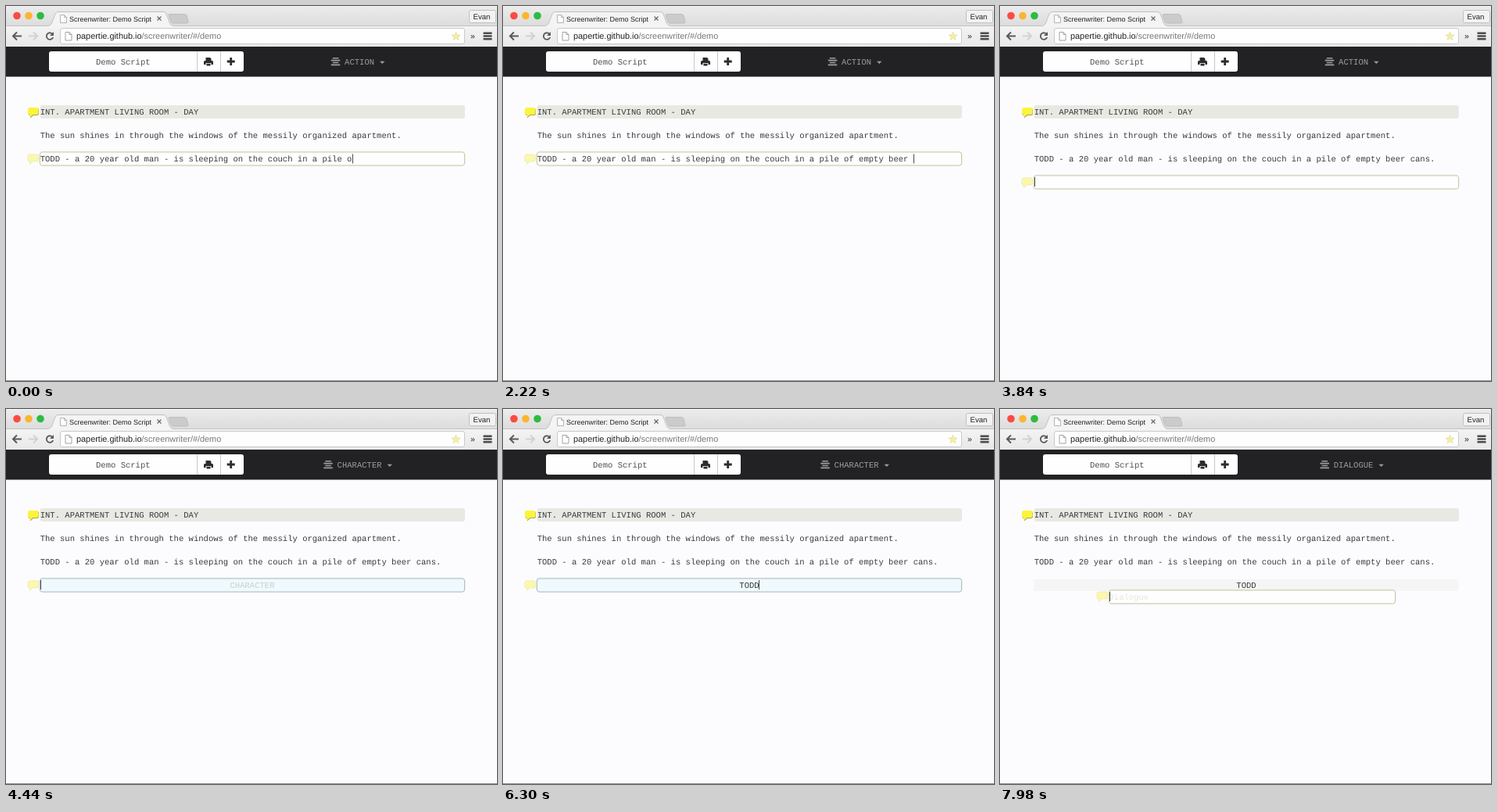
Animation of 628x480 px, one loop 8 s. Source, as an HTML page:

```html
<!DOCTYPE html>
<html lang="en">
<head>
<meta charset="utf-8">
<title>Screenwriter: Demo Script</title>
<style>
html, body { margin: 0; width: 100%; height: 100%; overflow: hidden; background: #fcfcfe; }
svg { display: block; width: 628px; height: 480px; }
text { text-rendering: geometricPrecision; white-space: pre; }
.ui { font-family: "Liberation Sans", Arial, sans-serif; fill: #222; }
.mono { font: 10.55px "Liberation Mono", "Courier New", monospace; fill: #3a3a3a; }
.mid { text-anchor: middle; }
.glow { fill: none; stroke-width: 2.5; opacity: .25; }
</style>
</head>
<body>
<svg viewBox="0 0 628 480" xmlns="http://www.w3.org/2000/svg">
  <defs>
    <linearGradient id="strip" x2="0" y2="1">
      <stop offset="0" stop-color="#ececec"/><stop offset="1" stop-color="#dcdcdc"/>
    </linearGradient>
    <linearGradient id="bar" x2="0" y2="1">
      <stop offset="0" stop-color="#f4f4f4"/><stop offset="1" stop-color="#e8e8e8"/>
    </linearGradient>
    <path id="bubble" d="M2.500 0H11.500Q13.500 0 13.500 2V7Q13.500 9 11.500 9H6.500L2.500 12.500V9H2Q0 9 0 7V2.500Q0 0 2.500 0Z"/>
  </defs>
  <rect width="628" height="480" fill="#fcfcfe"/>

  <!-- tab strip -->
  <rect width="628" height="26" fill="url(#strip)"/>
  <rect width="628" height="1" fill="#f6f6f6"/>
  <circle cx="14" cy="12.500" r="4.800" fill="#fb4b42"/>
  <circle cx="29" cy="12.500" r="4.800" fill="#fcb52f"/>
  <circle cx="44" cy="12.500" r="4.800" fill="#2cbc40"/>
  <path d="M209 10.500H228Q230 10.500 231 12.500L233 20Q233.500 22 231 22H214Q212 22 211 20L208 12Q208 10.500 209 10.500Z" fill="#cbcbcb" stroke="#b4b4b4" stroke-width=".7"/>
  <rect y="25" width="628" height="27" fill="url(#bar)"/>
  <path d="M0 25.500H54Q57 25 58.500 22L63 10Q64.500 7.500 67 7.500H201Q204 7.500 205 10L209.500 22Q211 25 214 25.500H628" fill="#f4f4f4" stroke="#b6b6b6" stroke-width=".8"/>
  <path d="M56 26H212" stroke="#f4f4f4" stroke-width="1.500"/>
  <path d="M69.500 11.500H74.500L77.500 14.500V21.500H69.500ZM74.500 11.500V14.500H77.500" fill="#fefefe" stroke="#adadad" stroke-width=".9"/>
  <text class="ui" x="81" y="19.500" font-size="9">Screenwriter: Demo Script</text>
  <path d="M193.500 13.500L198.500 18.500M198.500 13.500L193.500 18.500" stroke="#666" stroke-width="1.200"/>
  <rect x="592.500" y="5.500" width="34" height="16" rx="2" fill="#f2f2f2" stroke="#bbb" stroke-width=".9"/>
  <text class="ui mid" x="608.500" y="17" font-size="9.600">Evan</text>

  <!-- toolbar -->
  <g fill="none" stroke-width="2">
    <path d="M20 38.500H9.500M14 33.500L9 38.500L14 43.500" stroke="#5a5a5a"/>
    <path d="M29 38.500H39.500M35 33.500L40 38.500L35 43.500" stroke="#d2d2d2"/>
    <path d="M59.800 36.300A4.300 4.300 0 1 0 60.200 40" stroke="#5a5a5a" stroke-width="1.800"/>
  </g>
  <path d="M61 33V38H56Z" fill="#5a5a5a"/>
  <rect x="69.500" y="28.500" width="517" height="20" rx="2.500" fill="#fefefe" stroke="#c4c4c4" stroke-width=".9"/>
  <path d="M76 33.500H81L84 36.500V44H76ZM81 33.500V36.500H84" fill="#fefefe" stroke="#a2a2a2"/>
  <text class="ui" x="90" y="42.300" font-size="10.900">papertie.github.io<tspan fill="#777">/screenwriter/#/demo</tspan></text>
  <path id="star" fill="#f3f0a0" stroke="#dedca0" stroke-width=".7"/>
  <text class="ui mid" x="597" y="42" font-size="10.500">»</text>
  <path d="M610.500 34.800H621.500M610.500 38.500H621.500M610.500 42.200H621.500" stroke="#4a4a4a" stroke-width="2.500"/>

  <!-- app bar -->
  <rect y="52" width="628" height="38.500" fill="#222224"/>
  <rect x="55" y="58" width="249" height="26" rx="3" fill="#fefefe"/>
  <path d="M244.500 58V84M274.500 58V84" stroke="#c8c8c8"/>
  <text class="mono mid" x="149.800" y="75" style="fill:#505050">Demo Script</text>
  <g fill="#2c2c2c">
    <path d="M255.500 66H261L262.500 67.500V70H255.500ZM254.500 70H263.500Q265 70 265 71.500V75H262.500V73H255.500V75H253V71.500Q253 70 254.500 70ZM256.500 73.800H261.500V76.500H256.500Z"/>
    <path d="M286.300 66H289.100V69.600H292.700V72.400H289.100V76H286.300V72.400H282.700V69.600H286.300Z"/>
  </g>
  <g id="menu">
    <path d="M2 66.700H9.500M0 69.600H11.500M2 72.500H9.500M0 75.400H11.500" stroke="#9d9d9d" stroke-width="1.600"/>
    <text id="kind" class="mono" x="17.300" y="75" style="fill:#9d9d9d"></text>
    <path id="drop" d="M0 70.800H6.400L3.200 74Z" fill="#9d9d9d"/>
  </g>

  <!-- script -->
  <rect x="43.500" y="127" width="543.500" height="17" rx="3" fill="#e9e9e4"/>
  <use href="#bubble" x="28.500" y="131" fill="#a9a559"/>
  <use href="#bubble" x="28" y="130" fill="#fbf53a"/>
  <text class="mono" x="43.700" y="139">INT. APARTMENT LIVING ROOM - DAY</text>
  <text class="mono" x="43.700" y="169">The sun shines in through the windows of the messily organized apartment.</text>
  <rect id="cue" x="43.500" y="218" width="543" height="15" fill="#f5f5f5"/>
  <g id="box">
    <rect class="glow" height="17" rx="3.500"/>
    <rect height="17" rx="3"/>
  </g>
  <text id="action" class="mono" x="43.700" y="199"></text>
  <text id="name" class="mono mid" x="315" y="229"></text>
  <text id="hint" class="mono"></text>
  <use id="noteA" href="#bubble" fill="#fbf8ab" stroke="#e6e3a8" stroke-width=".6"/>
  <use id="noteB" href="#bubble" fill="#fbf8ab" stroke="#e6e3a8" stroke-width=".6"/>
  <rect id="caret" width="1" height="12" fill="#4a4a4a"/>
  <rect y="479" width="628" height="1" fill="#909090"/>
</svg>
<script>
const LOOP = 8000, CH = 6.331, LEFT = 43.7;
const ACTION = "TODD - a 20 year old man - is sleeping on the couch in a pile of empty beer cans.";
const NAME = "TODD";
const START = 63;
const PLAIN = ["#fefefe", "#c9caa6"], BLUE = ["#eff9fe", "#aebfc2"];
// moments at which one more letter appears
const actionKeys = [90, 240, 600, 810, 1010, 1230, 1320, 1380, 1530, 1620, 1770, 1950, 2190, 2370, 2400, 2460, 2490, 2550];
const nameKeys = [5490, 5640, 5760, 5880];
const NEW_LINE = 3450, TO_CUE = 3900, TO_SPEECH = 6765, FADE = 500;

const $ = id => document.getElementById(id);
const set = (el, attrs) => { for (const k in attrs) el.setAttribute(k, attrs[k]); };
const typed = (keys, t) => keys.filter(k => k <= t).length;
const ease = p => { p = Math.min(1, Math.max(0, p)); return p * p * (3 - 2 * p); };

let star = "";
for (let i = 0; i < 10; i++) {
  const a = i * Math.PI / 5, r = i % 2 ? 2.5 : 5.8;
  star += (i ? "L" : "M") + (575.5 + r * Math.sin(a)).toFixed(2) + " " + (39 - r * Math.cos(a)).toFixed(2);
}
$("star").setAttribute("d", star + "Z");

function showMenu(kind) {
  const w = kind.length * CH;
  $("kind").textContent = kind;
  $("menu").setAttribute("transform", `translate(${450.3 - (w + 31) / 2} 0)`);
  $("drop").setAttribute("transform", `translate(${w + 24.3} 0)`);
}

function showBox(x, y, width, [fill, stroke]) {
  const [glow, frame] = $("box").children;
  set(glow, { x, y, width, stroke });
  set(frame, { x, y, width, stroke, fill });
}

function showHint(text, x, y, anchor, color) {
  const el = $("hint");
  el.textContent = text;
  set(el, { x, y });
  el.style.textAnchor = anchor;
  el.style.fill = color;
}

function showNotes(t) {
  set($("noteA"), { x: 28, y: t < NEW_LINE ? 190 : 220 });
  set($("noteB"), { x: 124, y: 234 });
  const p = ease((t - TO_SPEECH - 60) / FADE);
  $("noteA").style.opacity = 1 - p;
  $("noteB").style.opacity = p;
}

function render(t) {
  const n = START + typed(actionKeys, t);
  const m = typed(nameKeys, t);
  const cue = t >= TO_CUE, speech = t >= TO_SPEECH;
  $("action").textContent = ACTION.slice(0, n);
  $("name").textContent = NAME.slice(0, m);
  $("cue").style.display = speech ? "" : "none";
  showMenu(speech ? "DIALOGUE" : cue ? "CHARACTER" : "ACTION");
  showNotes(t);

  let x, y;
  if (speech) {
    showBox(139.5, 232, 366, PLAIN);
    showHint("Dialogue", 139.5, 244, "start", "#e6e6de");
    x = 140; y = 234;
  } else if (t >= NEW_LINE) {
    showBox(43.5, 217, 543, cue ? BLUE : PLAIN);
    showHint(cue && !m ? "CHARACTER" : "", 315, 229, "middle", "#c8cfcf");
    x = m ? 315 + m * CH / 2 - .5 : 44; y = 219;
  } else {
    showBox(43.5, 187, 543, PLAIN);
    showHint("", 0, 0, "start", "none");
    x = LEFT + n * CH; y = 189.5;
  }
  set($("caret"), { x: Math.round(x), y });
}

function tick() {
  render(performance.now() % LOOP);
  requestAnimationFrame(tick);
}
tick();
</script>
</body>
</html>
```
